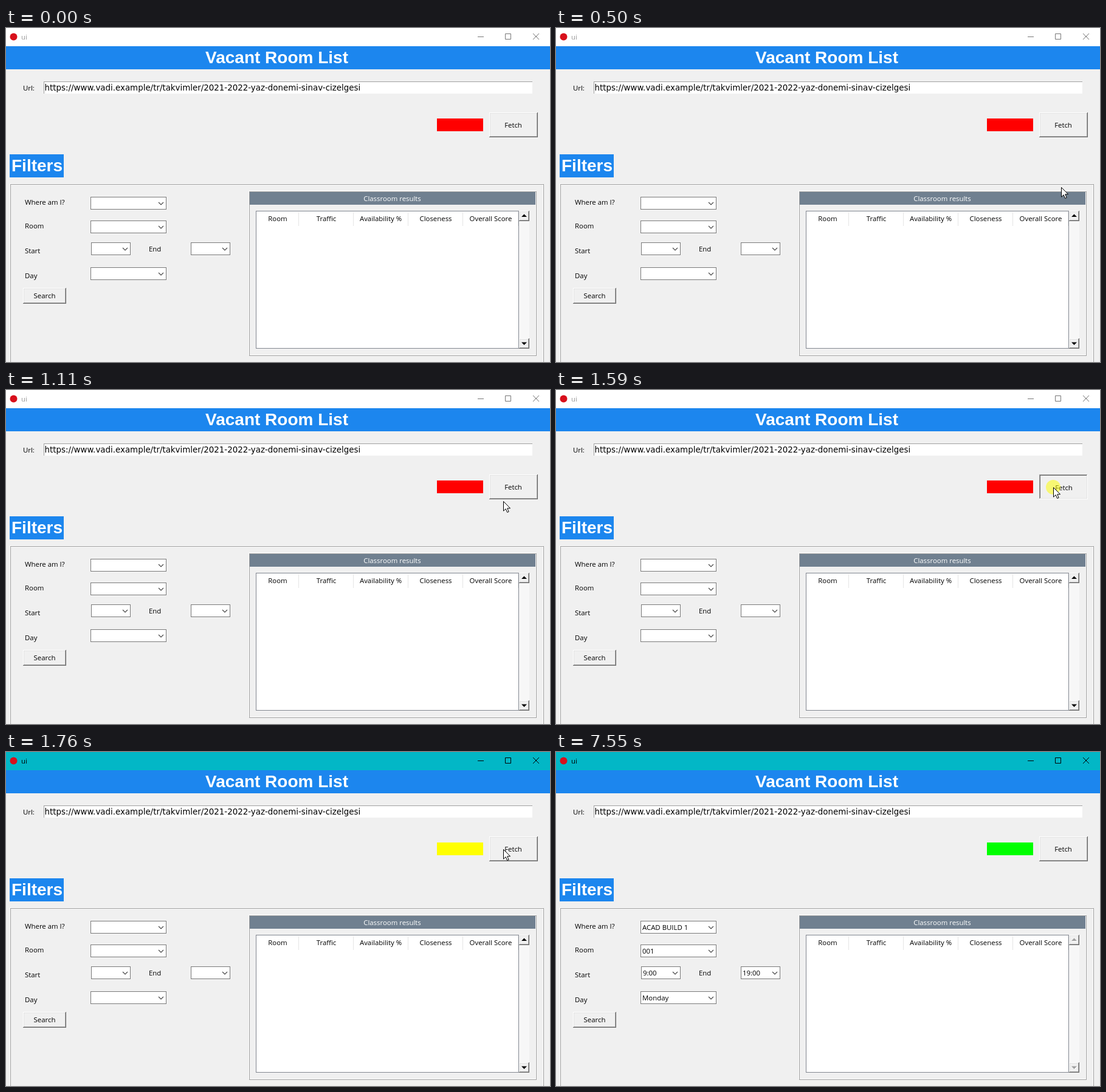
An HTML page for the animation above (8000 ms loop, 895 by 550 pixels).

```html
<!DOCTYPE html>
<html lang="en">
<head>
<meta charset="utf-8">
<title>Room list</title>
<style>
html, body { margin: 0; width: 100%; height: 100%; overflow: hidden; background: #f0f0f0; }
svg { display: block; width: 895px; height: 550px; }
text { font: 11.4px "Open Sans", "Noto Sans", sans-serif; fill: #000; white-space: pre; }
.mid { text-anchor: middle; }
.big { font: bold 28px "Liberation Sans", Arial, sans-serif; fill: #fff; }
.url { font: 13.4px "DejaVu Sans", Verdana, sans-serif; }
.light { fill: #fff; }
rect, .edge { shape-rendering: crispEdges; }

#bar, #caption, #controls, #press, #free, #glow, #lamp, #values, #live, #idle, #cursor {
  animation: 8s step-end infinite;
}
#bar { animation-name: bar; }
#caption { animation-name: caption; }
#controls { animation-name: controls; fill: none; }
#press { animation-name: press; }
#free { animation-name: free; }
#glow { animation-name: glow; }
#lamp { animation-name: lamp; }
#values, #idle { animation-name: loaded; }
#live { animation-name: waiting; }
#cursor { animation-name: cursor; }

@keyframes bar { 0% { fill: #fff } 21%, 100% { fill: #02b7c6 } }
@keyframes caption { 0% { fill: #999 } 21%, 100% { fill: #000 } }
@keyframes controls { 0% { stroke: #777 } 21%, 100% { stroke: #000 } }
@keyframes press { 0% { opacity: 0 } 19.875% { opacity: 1 } 22%, 100% { opacity: 0 } }
@keyframes free { 0% { opacity: 1 } 19.875% { opacity: 0 } 22%, 100% { opacity: 1 } }
@keyframes glow { 0% { opacity: 0 } 19.875% { opacity: .52 } 21%, 100% { opacity: 0 } }
@keyframes lamp { 0% { fill: #f00 } 22% { fill: #ff0 } 94.375%, 100% { fill: #0f0 } }
@keyframes loaded { 0% { opacity: 0 } 94.375%, 100% { opacity: 1 } }
@keyframes waiting { 0% { opacity: 1 } 94.375%, 100% { opacity: 0 } }
@keyframes cursor {
  0% { opacity: 0; transform: translate(752px, 454px) }
  3.5% { opacity: 1; transform: translate(752px, 454px) }
  4.375% { opacity: 1; transform: translate(772px, 410px) }
  5.25% { opacity: 1; transform: translate(795px, 350px) }
  6.25% { opacity: 1; transform: translate(831px, 262px) }
  7.25% { opacity: 1; transform: translate(818px, 198px) }
  8.125% { opacity: 1; transform: translate(818px, 192px) }
  9% { opacity: 1; transform: translate(818px, 190px) }
  13.125% { opacity: 1; transform: translate(818px, 183px) }
  14% { opacity: 1; transform: translate(818px, 168px) }
  14.875% { opacity: 1; transform: translate(818px, 160px) }
  30.75% { opacity: 1; transform: translate(826px, 161px) }
  31.625% { opacity: 1; transform: translate(844px, 163px) }
  32.5% { opacity: 1; transform: translate(864px, 163px) }
  33.5%, 100% { opacity: 0; transform: translate(864px, 163px) }
}
</style>
</head>
<body>
<svg id="stage" viewBox="0 0 895 550"></svg>
<script>
const rect = (x, y, w, h, fill, extra = '') =>
  `<rect x="${x}" y="${y}" width="${w}" height="${h}" fill="${fill}" ${extra}/>`;
const box = (x, y, w, h, line, fill = 'none') =>
  rect(x + .5, y + .5, w - 1, h - 1, fill, `stroke="${line}"`);
const text = (x, y, str, cls = '') => `<text x="${x}" y="${y}" class="${cls}">${str}</text>`;
const path = (d, extra) => `<path d="${d}" ${extra}/>`;
const edge = (d, color) => path(d, `class="edge" fill="none" stroke="${color}"`);

// Raised frame: a white outline with a grey one shifted by a pixel
const ridge = (x, y, w, h) =>
  box(x, y, w - 1, h - 1, '#fff') + box(x + 1, y + 1, w - 1, h - 1, '#a0a0a0');

const topLeft = (x, y, w, h) => `M${x + .5} ${y + h}V${y + .5}H${x + w}`;
const lowRight = (x, y, w, h) => `M${x} ${y + h - .5}H${x + w - .5}V${y}`;

// Two-pixel bevel; colours run outer light, inner light, inner dark, outer dark
const bevel = (x, y, w, h, [a, b, c, d]) =>
  rect(x, y, w, h, '#f0f0f0') +
  edge(topLeft(x + 1, y + 1, w - 2, h - 2), b) +
  edge(topLeft(x, y, w, h), a) +
  edge(lowRight(x + 1, y + 1, w - 2, h - 2), c) +
  edge(lowRight(x, y, w, h), d);
const raised = (...b) => bevel(...b, ['#fff', '#e3e3e3', '#a0a0a0', '#696969']);
const sunken = (...b) => bevel(...b, ['#a0a0a0', '#696969', '#e3e3e3', '#fff']);

const combo = (x, y, w) =>
  box(x, y, w, 21, '#7a7a7a', '#fff') +
  path(`M${x + w - 13} ${y + 9}l4 4l4 -4`, 'fill="none" stroke="#444" stroke-width="1.1"');

const arrows = (color, d = 0) =>
  path(`M${848 + d} ${311 + d}h9l-4.5 -4.5zM${848 + d} ${517.5 + d}h9l-4.5 4.5z`, `fill="${color}"`);

const windowBar =
  rect(0, 0, 895, 30, '#fff', 'id="bar"') +
  '<circle cx="12.5" cy="14.5" r="6" fill="#d8101c"/>' +
  '<text id="caption" x="25" y="19">ui</text>' +
  path('M776 14.5h10M821.5 9.5h9v9h-9zM867 9l10 10M877 9l-10 10', 'id="controls"');

const header =
  rect(0, 30, 895, 38, '#1c86ee') +
  text(445.5, 58, 'Vacant Room List', 'big mid') +
  text(28, 103, 'Url:') +
  rect(62, 88, 804, 20, '#fff') +
  edge(topLeft(62, 88, 804, 20), '#a0a0a0') +
  text(63.5, 103, 'https://www.vadi.example/tr/takvimler/2021-2022-yaz-donemi-sinav-cizelgesi', 'url') +
  rect(709, 149, 76, 21, '#f00', 'id="lamp"') +
  `<g id="free">${raised(795, 139, 80, 41)}${text(834.5, 164, 'Fetch', 'mid')}</g>` +
  `<g id="press">${sunken(795, 139, 80, 41)}${text(835.5, 165, 'Fetch', 'mid')}</g>`;

const filters =
  rect(6, 208, 89, 38, '#1c86ee') +
  text(9, 236, 'Filters', 'big') +
  ridge(6, 256, 879, 320) +
  text(31, 291, 'Where am I?') + text(31, 330, 'Room') + text(31, 371, 'Start') +
  text(235, 368, 'End') + text(31, 412, 'Day') +
  combo(139, 278, 125) + combo(139, 317, 125) + combo(140, 353, 65) +
  combo(304, 353, 65) + combo(139, 394, 125) +
  raised(28, 428, 71, 26) + text(63.5, 445, 'Search', 'mid') +
  `<g id="values">${
    text(142, 293, 'ACAD BUILD 1') + text(142, 332, '001') + text(143, 368, '9:00') +
    text(307, 368, '19:00') + text(142, 409, 'Monday')}</g>`;

const columns = [[447, 'Room'], [527, 'Traffic'], [616.5, 'Availability %'],
  [707, 'Closeness'], [797.5, 'Overall Score']];

const results =
  ridge(399, 268, 474, 272) +
  rect(401, 270, 470, 21, '#708090') +
  text(635.5, 285, 'Classroom results', 'mid light') +
  box(411, 301, 433, 227, '#828790', '#fff') +
  columns.map(([x, name]) => text(x, 318, name, 'mid')).join('') +
  [481, 571, 661, 751, 842].map(x => rect(x, 303, 1, 23, '#e5e5e5')).join('') +
  rect(844, 301, 17, 227, '#f7f7f7') +
  raised(844, 301, 17, 17) + raised(844, 511, 17, 17) +
  `<g id="live">${arrows('#000')}</g>` +
  `<g id="idle">${arrows('#fff', 1)}${arrows('#a0a0a0')}</g>`;

const pointer =
  '<circle id="glow" cx="818" cy="160" r="12" fill="#ff0"/>' +
  '<g id="cursor">' +
  path('M.5 .5V16.2L4.1 12.7L6.7 18.5L9.2 17.4L6.7 11.8H11.6Z',
    'fill="#fff" stroke="#000" stroke-width="1"') + '</g>';

document.getElementById('stage').innerHTML = windowBar + header + filters + results + pointer;
</script>
</body>
</html>
```
